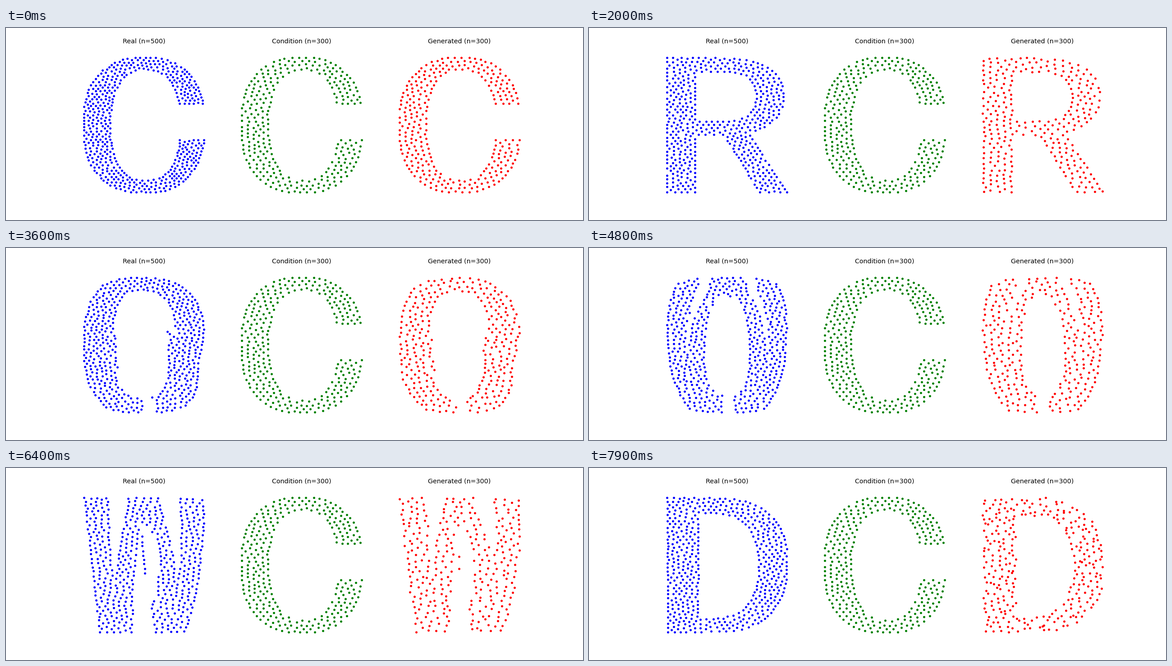
Animation, 1280 px wide and 427 px high, one loop 8000 ms. Source, as a matplotlib script:

```python
import numpy as np
import matplotlib.pyplot as plt
from matplotlib.animation import FuncAnimation

W, H, DPI = 1280, 427, 64
STEPS = 20            # frames per morph
STRETCH = 1.5         # letters are drawn wider than they are sampled
L, R, T, B = 173, 440, 66, 365
CX, CY = (L + R) / 2, (T + B) / 2
rng = np.random.default_rng(4)
x, y = (g.ravel() for g in np.meshgrid(np.linspace(L, R, 108),
                                       np.linspace(T, B, 176)))


# Each shape is a mask over the grid of possible dot places.
def box(x0, x1, y0, y1):
    return (x >= x0) & (x <= x1) & (y >= y0) & (y <= y1)


def oval(cx, cy, rx, ry, power=2.4):
    return abs((x - cx) / rx) ** power + abs((y - cy) / ry) ** power <= 1


def bowl(x0, cx, x1, y0, y1):
    """A box whose right end is half an oval."""
    cap = oval(cx, (y0 + y1) / 2, x1 - cx, (y1 - y0) / 2)
    return box(x0, cx, y0, y1) | (cap & (x >= cx))


def stroke(top0, top1, low0, low1, y0=T, y1=B):
    t = (y - y0) / (y1 - y0)
    left, right = top0 + (low0 - top0) * t, top1 + (low1 - top1) * t
    return (t >= 0) & (x >= left) & (x <= right)


def mirrored(x0, x1, x2, x3):
    s = L + R
    return stroke(x0, x1, x2, x3) | stroke(s - x1, s - x0, s - x3, s - x2)


disc = oval(CX, CY, CX - L, CY - T)
letters = {
    "C": disc & ~oval(310, CY, 76, 122) & ~box(310, R, 169, 248),
    "R": (box(L, 236, T, B) | stroke(300, 358, 378, R, 238)
          | bowl(L, 290, 433, T, 238) & ~bowl(237, 300, 371, 98, 207)),
    "O": disc & ~oval(CX, CY, 70, 121),
    "W": mirrored(L, 222, 215, 260) | mirrored(277, 314, 231, 276),
    "D": bowl(L, 270, R, T, B) & ~bowl(239, 270, 377, 99, 336),
}


def spread(letter, n, passes=4):
    """Even dots: move each one in turn to the emptiest place."""
    mask = letters[letter]
    px = (x[mask] / STRETCH).astype(np.float32)
    py = y[mask].astype(np.float32)
    dist2 = lambda k: (px - px[k]) ** 2 + (py - py[k]) ** 2
    pick = rng.choice(len(px), n, replace=False)
    dist = np.array([dist2(k) for k in pick])
    near, owner = dist.min(0), dist.argmin(0)
    for _ in range(passes):
        for p in rng.permutation(n):
            dist[p] = np.inf
            lost = np.flatnonzero(owner == p)
            part = dist[:, lost]
            near[lost], owner[lost] = part.min(0), part.argmin(0)
            pick[p] = near.argmax()
            dist[p] = dist2(pick[p])
            won = dist[p] < near
            near[won] = dist[p][won]
            owner[won] = p
    return np.column_stack([px[pick], py[pick]]).astype(float)


def match(a, b):
    """Cheapest one-to-one pairing of a with b (shortest augmenting paths)."""
    cost = ((a[:, None] - b[None]) ** 2).sum(2)
    n = len(a)
    u, v = np.zeros(n), np.zeros(n)
    row_of, col_of = np.full(n, -1), np.full(n, -1)
    for start in range(n):
        best, prev = np.full(n, np.inf), np.full(n, -1)
        done = np.zeros(n, bool)
        i, low = start, 0.0
        while True:
            d = cost[i] - v + (low - u[i])
            closer = (d < best) & ~done
            best[closer] = d[closer]
            prev[closer] = i
            j = np.where(done, np.inf, best).argmin()
            low = best[j]
            done[j] = True
            if row_of[j] < 0:
                break
            i = row_of[j]
        u[start] += low
        taken = done & (row_of >= 0)
        u[row_of[taken]] += low - best[taken]
        v[done] -= low - best[done]
        while True:
            i = prev[j]
            row_of[j] = i
            col_of[i], j = j, col_of[i]
            if i == start:
                break
    return col_of


def morph_keys(n, noise=0.0):
    """Dots of every letter, paired in order; noise grows along the word."""
    keys = []
    for k, letter in enumerate("CROWD"):
        dots = spread(letter, n)
        if keys:
            dots = dots[match(keys[-1], dots)]
        keys.append(dots + rng.normal(0, 1, dots.shape) * noise * k)
    return keys


def fit(pts):
    lo, hi = pts.min(0), pts.max(0)
    return (pts - lo) / (hi - lo)


real = morph_keys(500)
made = morph_keys(300, noise=0.6)
condition = spread("C", 300)

fig, axes = plt.subplots(1, 3, figsize=(W / DPI, H / DPI), dpi=DPI)
fig.subplots_adjust(left=0.125, right=0.9, bottom=0.11, top=0.88, wspace=0.2)
panels = [("Real (n=500)", "blue", real[0]),
          ("Condition (n=300)", "green", condition),
          ("Generated (n=300)", "red", made[0])]
clouds = []
for ax, (title, color, pts) in zip(axes, panels):
    ax.axis("off")
    ax.set_xlim(-0.05, 1.05)
    ax.set_ylim(1.05, -0.05)
    ax.set_title(title, fontsize=16, pad=19.4, fontname="DejaVu Sans")
    clouds.append(ax.scatter(*fit(pts).T, s=17.8, c=color, linewidths=1.33))


def update(frame):
    k, step = divmod(frame, STEPS)
    t = step / STEPS
    for cloud, keys in ((clouds[0], real), (clouds[2], made)):
        cloud.set_offsets(fit((1 - t) * keys[k] + t * keys[k + 1]))
    return clouds


anim = FuncAnimation(fig, update, frames=4 * STEPS, interval=100,
                     repeat=True, repeat_delay=0)
plt.show()
```
